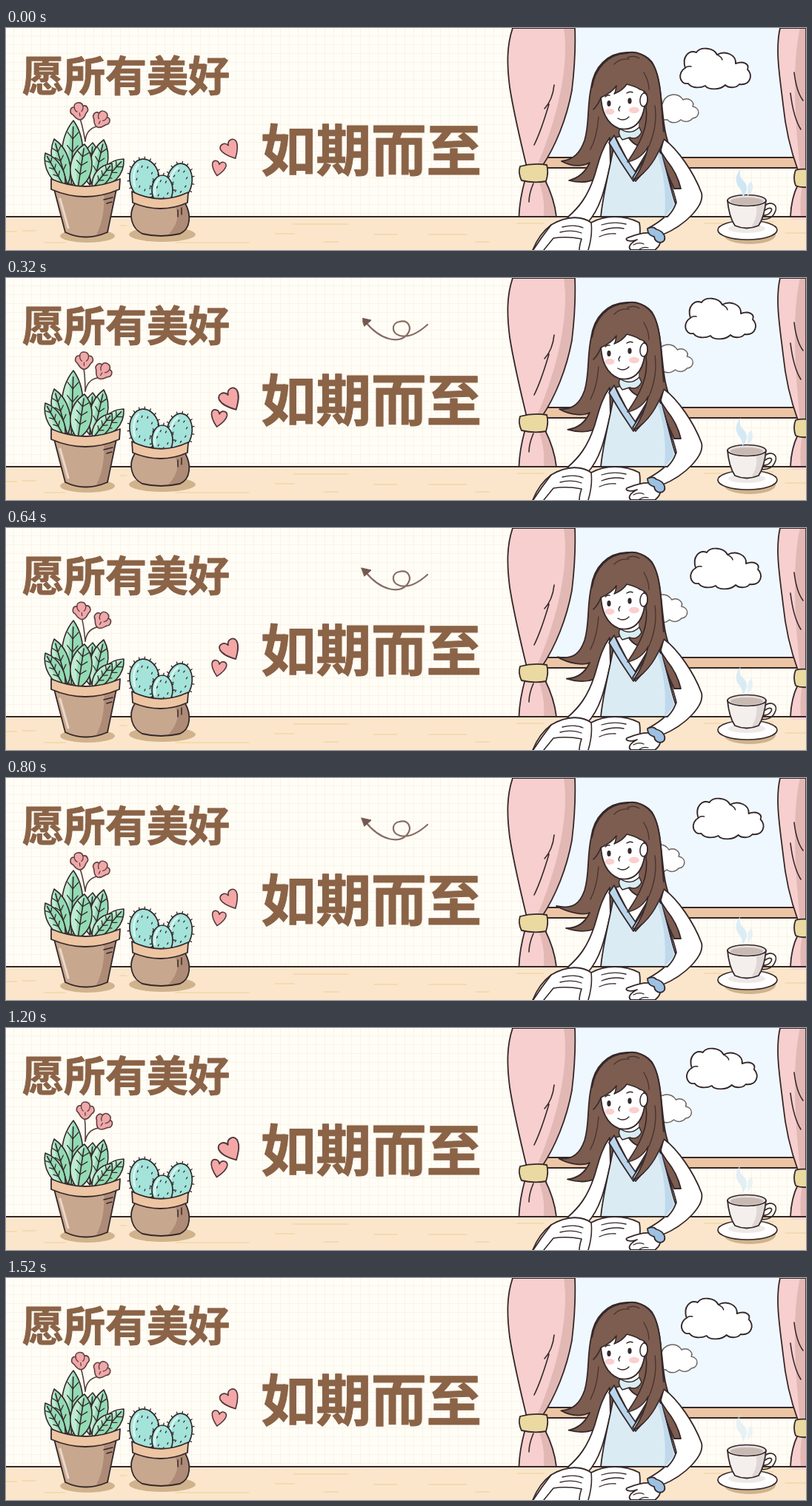
Recreate the animation shown at these times as an HTML page with a canvas. Size 1080 px wide and 300 px high, loop 1600 ms.

```html
<!DOCTYPE html>
<html lang="zh">
<head>
<meta charset="utf-8">
<style>
html, body { margin: 0; width: 100%; height: 100%; overflow: hidden; background: #fffdf6; }
canvas { display: block; width: 1080px; height: 300px; }
</style>
</head>
<body>
<canvas id="stage" width="1080" height="300"></canvas>
<script>
const ctx = document.getElementById('stage').getContext('2d');
const LOOP = 1600, STEP = 80, TAU = Math.PI * 2;
const INK = '#35282a', PINK = '#f6cfce', ROSE = '#e2b8b5', HAIR = '#7d5d50', BLUE = '#b9d5ec';

const clamp = v => Math.max(0, Math.min(1, v));
// Triangle wave: 0 at the ends of the period, 1 in the middle.
const swing = (t, period) => 1 - Math.abs(2 * (t % period) / period - 1);

function paint(path, fill, stroke, width = 1.8) {
  if (fill) { ctx.fillStyle = fill; ctx.fill(path); }
  if (stroke) { ctx.strokeStyle = stroke; ctx.lineWidth = width; ctx.stroke(path); }
}
const shape = (d, fill, stroke = INK, width) => paint(new Path2D(d), fill, stroke, width);
const line = (d, width = 1.5, color = INK) => shape(d, null, color, width);
function oval(x, y, rx, ry, fill, stroke, angle = 0, width) {
  const p = new Path2D();
  p.ellipse(x, y, rx, ry, angle, 0, TAU);
  paint(p, fill, stroke, width);
}
function at(x, y, angle, scale, draw) {
  ctx.save();
  ctx.translate(x, y);
  ctx.rotate(angle);
  ctx.scale(scale, scale);
  draw();
  ctx.restore();
}
function clipped(d, draw) {
  ctx.save();
  ctx.clip(new Path2D(d));
  draw();
  ctx.restore();
}

function wall() {
  ctx.fillStyle = '#fffdf6';
  ctx.fillRect(0, 0, 1080, 300);
  ctx.fillStyle = '#f8f4e9';
  for (let x = 10; x < 1080; x += 12) ctx.fillRect(x, 0, 1, 255);
  for (let y = 10; y < 255; y += 12) ctx.fillRect(0, y, 1080, 1);
}

function windowView(k) {
  ctx.fillStyle = '#eff8fe';
  ctx.fillRect(725, 0, 355, 175);
  at(-19 * k, 0, 0, 1, () => shape('M884 124C872 118 874 104 886 103C890 88 907 86 914 97C922 93 930 100 927 106C938 108 937 121 927 122C922 128 915 127 911 124C904 130 896 128 893 124Z', '#fff', '#6c6462', 1.5));
  at(17.6 * k, 1, 0, 1, () => {
    shape('M921 74C909 76 906 59 917 53C912 38 922 28 932 32C937 24 955 25 960 35C971 29 986 35 985 47C996 43 1004 48 1001 55C1009 62 1005 77 990 75C985 81 975 80 971 76C964 83 948 83 944 77C936 81 925 80 921 74Z', '#fff', INK, 1.9);
    line('M960 35Q966 38 967 42M917 53Q920 50 925 51', 1.4);
  });
  ctx.fillStyle = '#ecc5a4';
  ctx.fillRect(722, 175, 345, 14);
  line('M722 175H1068M722 189H1068', 1.8);
}

function curtains() {
  const left = 'M684 0C676 24 676 48 680 80C686 118 694 150 703 188H723C742 160 757 122 764 84C768 50 769 24 768 0Z';
  const leftTail = 'M701 204C696 222 693 238 692.500 255H743C741 237 735 220 727 204Z';
  shape(left, PINK, null);
  clipped(left, () => shape('M753 0C760 45 748 115 716 188H770V0Z', ROSE, null));
  shape(left, null);
  shape(leftTail, PINK, null);
  clipped(leftTail, () => shape('M718 204Q728 228 726 255H746V204Z', ROSE, null));
  shape(leftTail, null);
  line('M740 77Q738 97 727 109M733 103Q722 140 713 158M712 210Q706 224 706 235', 1.6);
  shape('M694 187Q712 182 730 185Q733 195 729 207Q713 210 696 206Q691 196 694 187Z', '#ead9a0');
  const right = 'M1045 0C1038 30 1045 68 1049 103C1053 143 1061 170 1069 192H1080V0Z';
  shape(right, PINK, null);
  clipped(right, () => shape('M1072 0Q1058 60 1072 192H1080V0Z', ROSE, null));
  shape(right, null);
  shape('M1069 212Q1060 230 1059 255H1082V212Z', PINK);
  shape('M1075 212Q1071 232 1073 255H1080V212Z', ROSE, null);
  line('M1064 60Q1067 86 1076 98M1059 88Q1063 121 1073 137', 1.6);
  shape('M1066 192Q1074 190 1082 191V215Q1073 216 1066 213Q1062 202 1066 192Z', '#ead9a0');
}

function desk() {
  ctx.fillStyle = '#fbe6cb';
  ctx.fillRect(0, 255, 1080, 45);
  line('M0 275H14M22 274H40M52 290H80M154 267H163M194 275H206M229 290H328M363 278H389M388 265H462M429 289H449M497 279H528M571 279H622M634 289H652M690 264H726M943 264H968M997 262H1036M1052 277H1080', 1.5, '#f0d7a9');
  shape('M1058 256H1080V259H1062Z', '#f9d5d5', null);
  line('M0 255H1080', 2);
}

function leaf(bx, by, tx, ty, w) {
  const len = Math.hypot(tx - bx, ty - by);
  at(bx, by, Math.atan2(ty - by, tx - bx), 1, () => {
    const a = len * .25, b = len * .72;
    const outline = `M0 0C${a} ${-w} ${b} ${-w} ${len} 0C${b} ${w} ${a} ${w} 0 0Z`;
    shape(outline, '#93dbb5', null);
    shape(`M0 0C${a} ${-w} ${b} ${-w} ${len} 0C${b} ${-w * .35} ${a} ${-w * .35} 0 0Z`, '#c0ebd3', null);
    shape(outline + `M0 0H${len * .9}`, null, INK, 1.6);
    for (let i = .32; i < .8; i += .2)
      line(`M${len * (i + .1)} ${-w * .38}L${len * i} 0L${len * (i + .1)} ${w * .38}`, 1.3);
  });
}

function flower(x, y, angle, baseY) {
  at(107, baseY, angle, 1, () => {
    line(`M0 0Q${x * .2 - 3} ${y * .65} ${x} ${y + 8}`, 1.6, '#554040');
    at(x, y, Math.atan2(x, -y) * .75, 1, () => {
      shape('M0 11C-5 11 -7 6 -9 3C-14 0 -12 -8 -6 -7C-6 -14 5 -14 6 -7C12 -8 14 0 9 3C7 6 5 11 0 11Z', '#f0a8a9', '#5c4040', 1.6);
      line('M-6 -7Q-6 -2 -3 0M6 -7Q6 -2 3 0M0 2V6', 1.3, '#5c4040');
    });
  });
}

function cactus(x, y, rx, ry, angle) {
  at(x, y, angle, 1, () => {
    oval(0, 0, rx, ry, '#a3e3da', INK, 0, 1.7);
    line(`M${-rx * .72} ${ry * .3}Q${-rx * .8} ${-ry * .45} ${-rx * .3} ${-ry * .76}`, 3, '#d7f5ef');
    const count = Math.round((rx + ry) / 2.6);
    for (let i = 0; i < count; i++) {
      const a = i / count * TAU, c = Math.cos(a), s = Math.sin(a);
      line(`M${c * rx} ${s * ry}L${c * (rx + 3)} ${s * (ry + 3)}`, 1.3);
      if (i % 2) line(`M${c * rx * .55} ${s * ry * .6}l1 -2`, 1.3);
    }
  });
}

function plants(t) {
  const k = swing(t, 800);
  oval(110, 281, 37, 9, '#d0b38d');
  oval(211, 279, 45, 10, '#d0b38d');
  flower(-8, -40, .2 * k, 153);
  flower(21, -29, .13 * k, 153);
  leaf(88, 214, 91, 125, 19);
  leaf(83, 212, 65, 150, 15);
  leaf(79, 215, 53, 169, 13);
  leaf(113, 212, 117, 155, 16);
  leaf(118, 214, 132, 151, 16);
  leaf(124, 215, 159, 177, 15);
  leaf(97, 217, 106, 157, 19);
  leaf(117, 217, 143, 183, 13);
  const pot = 'M65 218L80 276Q107 289 137 276L149 218Z';
  shape(pot, '#c8a78f', null);
  clipped(pot, () => {
    shape('M132 218Q135 258 119 285H150V218Z', '#ae8b77', null);
    line('M73 231L84 270', 3, '#ead8c9');
  });
  shape(pot, null);
  shape('M61 204Q107 224 154 204L153 218Q107 238 61 218Z', '#edc5a3');
  line('M132 232L144 229M136 237L143 235');

  cactus(187, 204, 20, 27, -.12);
  cactus(234, 208, 17, 25, .16);
  cactus(211, 219, 14, 20, 0);
  const bowl = 'M174 237C164 253 170 271 184 278Q209 284 235 278C250 271 250 252 242 237Z';
  shape(bowl, '#c8a78f', null);
  clipped(bowl, () => shape('M222 235Q244 254 215 284H252V235Z', '#ae8b77', null));
  shape(bowl, null);
  shape('M170 221Q208 240 246 222L245 236Q209 252 171 236Z', '#edc5a3');
  line('M232 246V255M237 243V252');
}

function hearts(t) {
  const s = 1 + .17 * swing(t, 800);
  const heart = 'M0 14C-7 7 -12 1 -12 -6C-11 -13 -2 -13 0 -6C2 -13 11 -13 12 -6C12 1 7 7 0 14Z';
  at(303, 164, -.5, s, () => shape(heart, '#f4a7a7', '#503638', 1.6));
  at(287, 189, .2, s * .78, () => shape(heart, '#f4a7a7', '#503638', 1.9));
}

function titles() {
  ctx.fillStyle = ctx.strokeStyle = '#8b6347';
  ctx.lineWidth = 1;
  const put = (text, x, y, size) => {
    ctx.font = `900 ${size}px "Noto Sans CJK SC", "Noto Sans CJK", sans-serif`;
    ctx.fillText(text, x, y);
    ctx.strokeText(text, x, y);
  };
  put('愿所有美好', 22, 85, 56);
  put('如期而至', 344, 192.500, 74.500);
}

function arrow(t) {
  const shown = clamp(Math.min(t / 328, (1190 - t) / 320));
  if (!shown) return;
  ctx.save();
  ctx.beginPath();
  ctx.rect(572 - 93 * shown, 40, 95, 60);
  ctx.clip();
  line('M569 63C558 73 545 81 532 78C520 75 520 61 531 59C544 56 549 68 541 77C531 88 507 86 485 59', 2.2, '#876c63');
  shape('M480 54L493 57L484 65Z', '#74574f', '#74574f', 1);
  ctx.restore();
}

function girl(k) {
  const tipX = 750 - 7 * k, tipY = 180 - 7 * k;
  shape(`M838 33C812 34 794 52 790 80C784 108 788 130 781 152C775 169 766 178 ${tipX} ${tipY}C${tipX + 16} ${tipY + 9} 780 186 788 182C782 195 772 203 ${760 - 4 * k} ${206 - 3 * k}C788 213 806 202 812 186L875 160L893 216Q902 213 911 217C910 194 895 166 890 140C884 110 886 70 872 46C862 34 850 32 838 33Z`, HAIR);
  // sleeves
  shape('M815 148C803 165 800 182 794 201C785 228 774 242 758 256L785 263C803 244 809 214 816 184Z', '#fff');
  shape('M888 150C907 164 928 194 939 223C943 239 919 266 885 280L868 270Q894 256 905 236C900 212 888 190 884 165Z', '#fff');
  shape('M884 167Q889 190 902 217L911 217Q906 196 892 179Z', HAIR);
  // pinafore
  shape('M822 150C817 185 807 216 803 255H893Q901 247 904 238C895 212 891 180 878 158L848 200Z', '#dbebf3');
  shape('M878 166Q893 206 889 255L902 240Q893 202 885 171Z', '#bfd8ec', null);
  shape('M823 148L848 197L871 158Q850 166 838 144Z', '#fff');
  shape('M821 145L814 155Q829 181 847 207L853 199Q834 174 821 145Z', BLUE);
  shape('M876 155L846 202L850 207Q872 184 882 161Z', BLUE);
  shape('M831 130V140Q842 151 854 139V125Z', '#fff', null);
  shape('M829 136Q825 143 832 151L842 148Q852 152 858 141L855 134Q843 146 829 136Z', '#d8edf2', INK, 1.5);
  // face
  shape('M803 88C803 112 811 130 828 136C848 140 859 126 862 106L861 76L812 70Z', '#fff');
  oval(861, 97, 5, 9, '#fff', INK, .1, 1.5);
  oval(815, 113, 6.500, 4, '#fbcfce');
  oval(848, 111, 7, 4.200, '#fbcfce');
  oval(814, 102, 2.600, 4, INK);
  oval(842, 98.500, 2.600, 4, INK);
  line('M809 93Q812 90 815 91M838 88Q842 85 846 87M829 106Q826 110 828 112M826 122Q834 127 841 120', 1.4);
  // fringe and front locks
  const fringe = 'M793 110Q800 103 803 94C812 90 819 86 824 78C823 84 823 87 821 89Q833 84 838 76Q848 78 856 83C865 85 869 94 864 106C868 133 856 156 839 181Q858 177 867 160Q862 184 847 206C868 194 879 174 888 151';
  const crown = 'C884 116 887 73 872 47C862 34 850 32 838 34C812 35 795 55 792 80C790 91 790 99 793 110Z';
  shape(fringe + crown, HAIR, null);
  line(fringe, 1.6);
  line('M838 34C812 35 795 55 791 80M838 34C850 30 866 37 874 50C886 72 884 110 888 140', 1.9);
  line('M841 42Q828 41 821 49M855 41Q848 36 839 40M861 60Q868 72 868 83M876 105Q880 131 868 160M800 120Q798 147 789 164', 1.4, '#4b342f');
}

function book() {
  shape('M711 301Q722 284 736 266C758 253 778 254 790 263C808 253 834 252 855 263Q857 274 855 284L850 301Z', '#fff');
  line('M790 263Q792 280 786 300M726 300L739 284Q757 281 777 285Q774 294 774 300M736 266Q720 278 711 300', 1.6);
  line('M751 269Q768 265 779 270M748 276Q764 272 777 277M804 266Q820 261 837 265M804 274Q819 268 834 271M801 282Q812 277 823 278', 1.3);
  // hand and cuff
  shape('M869 277C856 276 846 281 838 284C835 288 845 289 852 286C842 291 839 297 844 300H876Q885 293 883 285Z', '#fff');
  line('M847 293Q855 289 861 292M855 299Q861 295 867 297', 1.3);
  shape('M866 271Q873 267 878 272Q886 274 889 281Q891 289 883 290Q876 289 875 282Q866 280 866 271Z', '#9cc1e3');
}

function coffee(t) {
  const p = t / LOOP;
  oval(1004, 280, 35, 12, '#d0b38d');
  oval(1001, 273, 40, 13, '#fff', INK, 0, 1.7);
  oval(1000, 271, 25, 6, '#eeeae7');
  line('M1023 241C1034 232 1043 240 1038 249C1035 257 1026 260 1017 258M1025 246C1032 241 1036 244 1032 249Q1028 254 1020 253', 1.7);
  const cup = 'M974 233Q976 255 984 267Q1000 274 1016 267Q1024 255 1026 233Z';
  shape(cup, '#f4efed', null);
  clipped(cup, () => shape('M1012 237Q1017 254 1004 272H1027V233Z', '#dfd7d5', null));
  shape(cup, null);
  oval(1000, 233, 26, 7.500, '#e6dfdc', INK, 0, 1.7);
  oval(1000, 234, 22, 5, '#c8bab3');
  ctx.save();
  ctx.globalAlpha = 1 - .55 * p;
  ctx.translate(0, -8 * p);
  shape('M992 190C984 199 984 209 990 216Q995 222 994 229C1003 220 1001 211 995 206C990 201 990 196 992 190Z', '#cfe6f4', null);
  shape('M1006 207C999 213 1002 218 1001 227C1010 219 1009 214 1006 207Z', '#dcedf6', null);
  ctx.restore();
}

function render(now) {
  const t = Math.floor(now % LOOP / STEP) * STEP;
  const drift = swing(t, LOOP);
  ctx.lineCap = ctx.lineJoin = 'round';
  wall();
  windowView(drift);
  curtains();
  desk();
  titles();
  arrow(t);
  plants(t);
  hearts(t);
  girl(drift);
  book();
  coffee(t);
}

const start = performance.now();
function tick() {
  render(performance.now() - start);
  requestAnimationFrame(tick);
}
tick();
</script>
</body>
</html>
```
